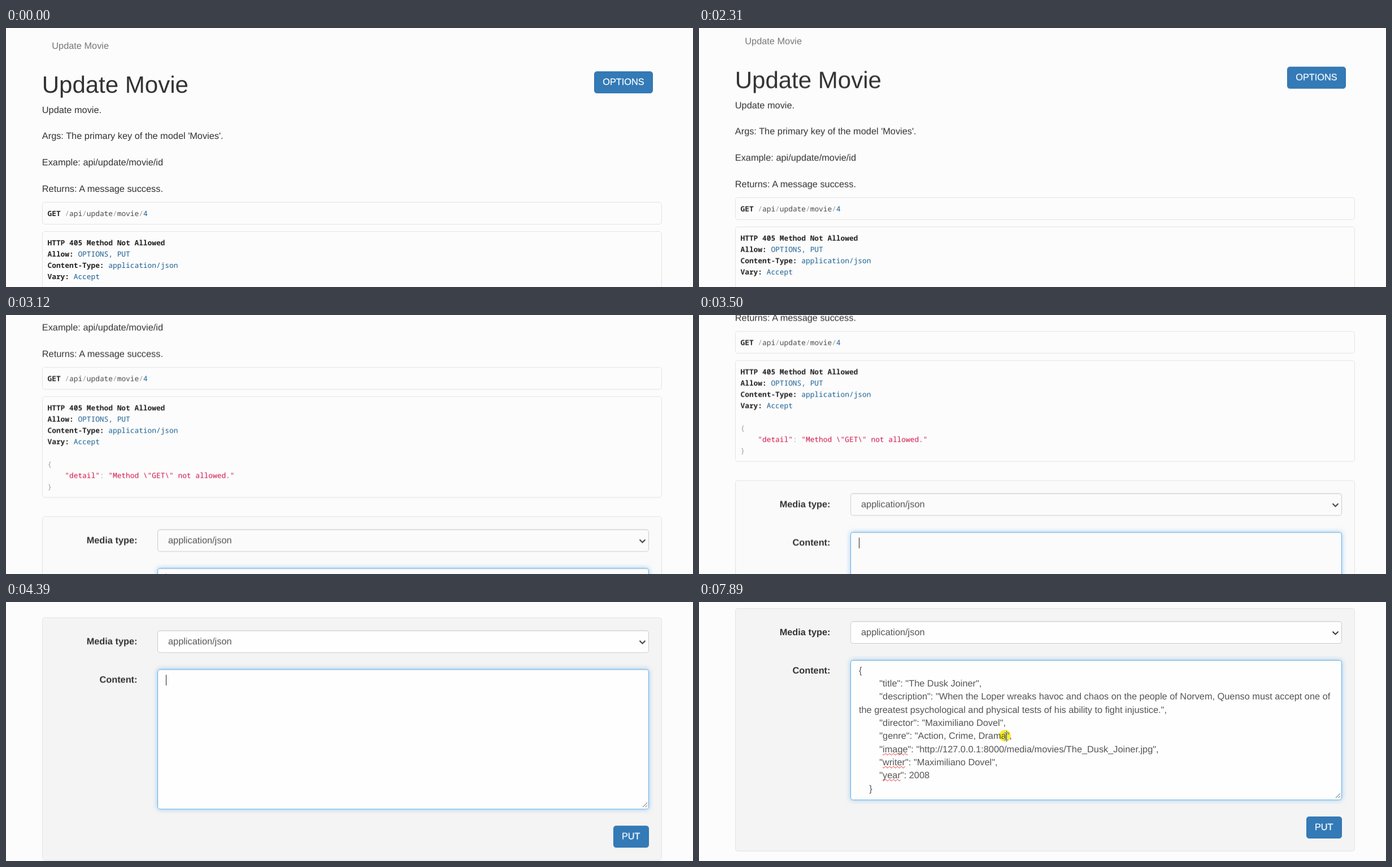
Recreate the animation shown at these times as an HTML page. Size 1216 by 460 pixels, loop 8000 ms.

```html
<!DOCTYPE html>
<html lang="en">
<head>
<meta charset="utf-8">
<title>Update Movie</title>
<style>
html, body { margin: 0; width: 100%; height: 100%; overflow: hidden; background: #fcfcfc; }
#stage {
  position: relative; width: 1216px; height: 460px; overflow: hidden;
  font: 16.333px/23.333px "Liberation Sans", Arial, sans-serif; color: #333;
  text-rendering: geometricPrecision;
}
#stage * { box-sizing: border-box; }
#page { position: absolute; left: 0; top: 0; width: 1216px; height: 1023px; animation: scroll 8s linear infinite; }
#page > *, .ptr { position: absolute; margin: 0; white-space: pre; }

.crumb { left: 81.3px; top: 21.3px; color: #777; }
h1 { left: 63.7px; top: 76.6px; font-size: 42px; line-height: 47px; font-weight: 400; }
.doc { left: 63.8px; top: 134.7px; }
.btn {
  height: 39.5px; border: 1px solid #2f71aa; border-radius: 4.67px; background: #337ab7;
  color: #fff; text-align: center; line-height: 36.5px; -webkit-text-stroke: .25px #fff;
}
.options { left: 1041px; top: 76.5px; width: 104px; }
.put { left: 1075px; top: 943.5px; width: 62.5px; }

.code {
  left: 63.5px; width: 1097.5px; padding: 9px; border: 1px solid #e3e3e5; border-radius: 4.67px;
  font: 12.83px/20px "Noto Sans Mono", "Liberation Mono", monospace; color: #48484c;
}
.code b { color: #222; }
.code i { font-style: normal; color: #93a1a1; }
.code u { text-decoration: none; color: #195f91; }
.code s { text-decoration: none; color: #d11149; }

.panel { left: 63.5px; top: 574px; width: 1097.5px; height: 432px; border: 1px solid #e3e3e3; border-radius: 4.67px; animation: panel 8s step-end infinite; }
.label { right: 983.5px; font-weight: 700; }
.field { left: 267.5px; width: 870px; border: 1px solid #ccc; border-radius: 4.67px; color: #555; animation: field 8s step-end infinite; }
.select { top: 597px; height: 40px; padding: 7.8px 18.5px; box-shadow: inset 0 1px 1px rgba(0,0,0,.06); }
.area { top: 665.5px; height: 249px; padding: 7.2px 14.5px; border-color: #66afe9; box-shadow: inset 0 1px 1px rgba(0,0,0,.06), 0 0 8px rgba(102,175,233,.6); }
.field svg { position: absolute; fill: none; }
.json { animation: paste 8s step-end infinite; }
.json u { text-decoration: underline wavy 1.4px transparent; text-underline-offset: 1px; text-decoration-skip-ink: none; animation: spell 8s step-end infinite; }
.caret { left: 283px; top: 676px; width: 1px; height: 19px; background: #222; animation: caret 8s step-end infinite; }

.ptr { left: 0; top: 0; overflow: visible; }
#arrow { animation: arrow 8s linear infinite; }
#beam { animation: beam 8s linear infinite; }
#halo { left: 531px; top: 227px; width: 21px; height: 21px; border-radius: 50%; background: #f8ee20; mix-blend-mode: multiply; opacity: 0; animation: halo 8s step-end infinite; }

@keyframes scroll {
  0%, 28.87% { transform: translateY(0); }
  28.875% { transform: translateY(-7.5px); }
  29.75% { transform: translateY(-61px); }
  30.5%, 32.2% { transform: translateY(-117px); }
  35.6% { transform: translateY(-160px); }
  38.1% { transform: translateY(-200px); }
  39%, 39.6% { transform: translateY(-216.5px); }
  41.25%, 42.3% { transform: translateY(-233px); }
  44.1% { transform: translateY(-291.5px); }
  45% { transform: translateY(-307px); }
  46.5% { transform: translateY(-350px); }
  48.25% { transform: translateY(-418.5px); }
  49.1% { transform: translateY(-440px); }
  51.75%, 53.12% { transform: translateY(-467px); }
  53.125% { transform: translateY(-473px); }
  54% { transform: translateY(-517px); }
  54.875% { transform: translateY(-546.5px); }
  55.75%, 100% { transform: translateY(-563px); }
}
@keyframes panel { 0% { background: #fafafa; } 53.125%, 100% { background: #f4f4f4; } }
@keyframes field { 0% { background: #fbfbfb; } 53.125%, 100% { background: #fefefe; } }
@keyframes paste { 0% { opacity: 0; } 70.5%, 100% { opacity: 1; } }
@keyframes spell { 0% { text-decoration-color: transparent; } 95.375%, 100% { text-decoration-color: #e22; } }
@keyframes halo { 0% { opacity: 0; } 95.375%, 100% { opacity: .95; } }
@keyframes caret {
  0% { transform: none; opacity: 1; }
  70.5% { transform: translate(23.5px, 210px); opacity: 1; }
  76.75% { transform: translate(23.5px, 210px); opacity: 0; }
  83% { transform: translate(23.5px, 210px); opacity: 1; }
  89.25% { transform: translate(23.5px, 210px); opacity: 0; }
  95.375%, 100% { transform: translate(261px, 116px); opacity: 1; }
}
@keyframes arrow {
  0%, .87% { transform: translate(1240px, 309px); }
  .875% { transform: translate(1042px, 309px); }
  3.5%, 5.6% { transform: translate(913px, 236px); }
  8% { transform: translate(1002px, 226px); }
  9% { transform: translate(1045px, 206px); }
  10% { transform: translate(1090px, 191px); }
  12% { transform: translate(1178px, 148px); }
  12.9% { transform: translate(1206px, 135px); }
  13.75%, 100% { transform: translate(1240px, 120px); }
}
@keyframes beam {
  0%, 62.24% { transform: translate(1240px, 231px); }
  62.25% { transform: translate(680px, 231px); }
  64.5% { transform: translate(565px, 206px); }
  65.4% { transform: translate(541px, 196px); }
  66.375%, 74.5% { transform: translate(549.5px, 201.5px); }
  79.5% { transform: translate(551px, 288px); }
  84.4% { transform: translate(541px, 268px); }
  94.5% { transform: translate(541px, 238.5px); }
  95.375%, 100% { transform: translate(543.5px, 238.5px); }
}
</style>
</head>
<body>
<div id="stage">
  <div id="page">
    <div class="crumb">Update Movie</div>
    <h1>Update Movie</h1>
    <div class="btn options">OPTIONS</div>
    <div class="doc">Update movie.

Args: The primary key of the model 'Movies'.

Example: api/update/movie/id

Returns: A message success.</div>
    <div class="code" style="top:309px;height:40px"><b>GET</b> <i>/</i>api<i>/</i>update<i>/</i>movie<i>/</i><u>4</u></div>
    <div class="code" style="top:361px;height:180px"><b>HTTP 405 Method Not Allowed</b>
<b>Allow:</b> <u>OPTIONS, PUT</u>
<b>Content-Type:</b> <u>application/json</u>
<b>Vary:</b> <u>Accept</u>

<i>{</i>
    <s>"detail"</s><i>:</i> <s>"Method \"GET\" not allowed."</s>
<i>}</i></div>

    <div class="panel"></div>
    <div class="label" style="top:606px">Media type:</div>
    <div class="label" style="top:674px">Content:</div>
    <div class="field select">application/json<svg style="left:851.5px;top:15.5px" width="13" height="9"><path d="M1.5 1.5l5 5 5-5" stroke="#333" stroke-width="1.8"/></svg></div>
    <div class="field area"><div class="json">{
        "title": "The Dusk Joiner",
        "description": "When the Loper wreaks havoc and chaos on the people of Norvem, Quenso must accept one of
the greatest psychological and physical tests of his ability to fight injustice.",
        "director": "Maximiliano Dovel",
        "genre": "Action, Crime, Drama",
        "<u>image</u>": "http://127.0.0.1:8000/media/movies/The_Dusk_Joiner.jpg",
        "<u>writer</u>": "Maximiliano Dovel",
        "<u>year</u>": 2008
    }</div><svg style="right:1px;bottom:1.5px" width="10" height="10"><path d="M1 9l8-8M5.5 9L9 5.5" stroke="#555"/></svg></div>
    <div class="caret"></div>
    <div class="btn put">PUT</div>
  </div>

  <div id="halo" class="ptr"></div>
  <svg id="arrow" class="ptr" width="12" height="18"><path d="M.5.5v14.5l3.4-3.2 2.3 5.3 2.3-1-2.3-5.1h4.6z" fill="#fff" stroke="#000"/></svg>
  <svg id="beam" class="ptr" width="1" height="1" fill="none">
    <path id="bar" d="M-3-6.5h2l1 1 1-1h2M0-5.5v11M-3 6.5h2l1-1 1 1h2" stroke-linecap="round"/>
    <use href="#bar" stroke="#fff" stroke-width="2.4"/>
    <use href="#bar" stroke="#222"/>
  </svg>
</div>
</body>
</html>
```
